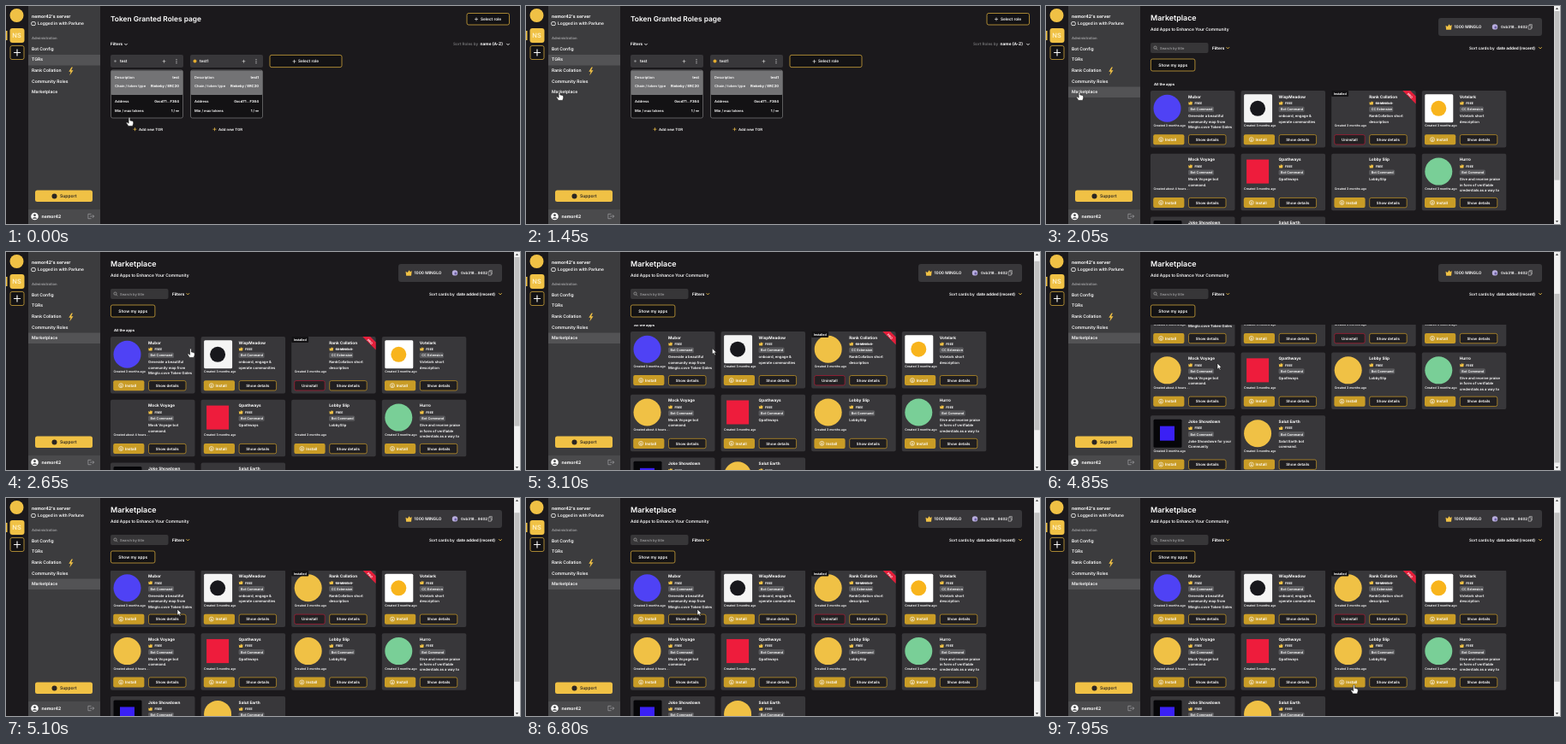
Animation of 600x255 px, one loop 8 s. Source, as an HTML page:

```html
<!DOCTYPE html>
<html lang="en">
<head>
<meta charset="utf-8">
<title>Server dashboard</title>
<style>
  html, body { margin: 0; width: 100%; height: 100%; overflow: hidden; background: #1b191c; }
  svg { display: block; width: 600px; height: 255px; }
  text { font: 600 5px Inter, Arial, sans-serif; fill: #fff; white-space: pre; text-rendering: geometricPrecision; }
  .b { font-weight: 700; }
</style>
</head>
<body>
<svg id="stage" viewBox="0 0 600 255"></svg>
<script>
const GOLD = '#f0c145', RIM = '#cda23a', PANEL = '#3c3c3e', CARD = '#38373a', BLACK = '#131214';
const END = 'text-anchor="end"', MID = 'text-anchor="middle"';

// Drawing helpers, each returning SVG markup
const text = (x, y, size, str, attrs = '') =>
  `<text x="${x}" y="${y}" style="font-size:${size}px" ${attrs}>${str.replace('&', '&amp;')}</text>`;
const bold = (x, y, size, str, attrs = '') => text(x, y, size, str, 'class="b" ' + attrs);
const tinted = (x, y, size, str, color) =>
  `<text x="${x}" y="${y}" style="font-size:${size}px;fill:${color}">${str}</text>`;
const rect = (x, y, w, h, fill, r = 0, attrs = '') =>
  `<rect x="${x}" y="${y}" width="${w}" height="${h}" rx="${r}" fill="${fill}" ${attrs}/>`;
const circle = (x, y, r, fill, attrs = '') => `<circle cx="${x}" cy="${y}" r="${r}" fill="${fill}" ${attrs}/>`;
const line = (d, color = '#fff', width = .8) => `<path d="${d}" fill="none" stroke="${color}" stroke-width="${width}"/>`;
const shape = (d, fill) => `<path d="${d}" fill="${fill}"/>`;
const box = (x, y, w, h, color = RIM, fill = BLACK) => rect(x, y, w, h, fill, 2, `stroke="${color}" stroke-width=".8"`);
const plus = (x, y, r, color, width) => line(`M${x - r} ${y}h${2 * r}M${x} ${y - r}v${2 * r}`, color, width);
const chevron = (x, y, color = '#fff') => line(`M${x - 1.7} ${y - .8}l1.7 1.7 1.7-1.7`, color, .9);
const coin = (x, y) => shape(`M${x - 2.3} ${y - 1.2}l1.5 .8 1.2-1.8 .9 1.3 1.2-.8-.5 3.8h-3.9z`, GOLD);

const menu = ['Bot Config', 'TGRs', 'Rank Collation', 'Community Roles', 'Marketplace'];

function sidebar() {
  return rect(26, 0, 84, 255, PANEL) + rect(26, 57, 84, 12.5, '#535355', 0, 'id="active"')
    + circle(12.5, 11, 8, GOLD)
    + rect(0, 29, 1.5, 11, GOLD) + rect(4.5, 26, 17, 17, GOLD, 3) + tinted(7.3, 37.2, 7.4, 'NS', '#fff3cc')
    + box(5, 46.5, 16, 16) + plus(13, 54.5, 4, '#fff', 1.1)
    + bold(30, 14.2, 5.2, "nemor42's server")
    + rect(29.7, 18.6, 4.6, 4, 'none', 1.2, 'stroke="#fff" stroke-width=".8"')
    + text(37, 22.3, 4.9, 'Logged in with Parlune')
    + tinted(30, 38.8, 4.2, 'Administration', '#a3a3a5')
    + menu.map((label, i) => text(30, 51.6 + 12.7 * i, 5, label)).join('')
    + shape('M76.5 71.5l-3.2 5.2h2.2l-1.2 4.5 4.2-6h-2.4l1.8-3.7z', GOLD)
    + rect(34, 215.5, 67, 13.5, GOLD, 2.5) + circle(56.5, 222.4, 3, '#2a2522')
    + tinted(63, 224.3, 5, 'Support', '#2a2522')
    + rect(26, 238, 84, 17, '#4a4a4c') + circle(33.5, 246, 4.3, '#fff') + circle(33.5, 244.7, 1.4, '#4a4a4c')
    + shape('M30.8 248.8a2.8 2.4 0 0 1 5.4 0z', '#4a4a4c') + bold(41.5, 248, 5.1, 'nemor42')
    + line('M99.5 243.3h-3.6v5.4h3.6M98 246h4.8m-1.7-1.7l1.7 1.7-1.7 1.7', '#a3a3a5', .7);
}

function roleColumn(x, name, dotColor, dotSize) {
  const rows = [['Description', name, 85], ['Chain / token type', 'Rinkeby / ERC20', 95.2],
    ['Address', '0xcd71...F364', 112.8], ['Min / max tokens', '1 / ∞', 123.8]];
  return rect(x, 57, 85, 15, CARD, 2) + circle(x + 5.5, 64.5, dotSize, dotColor) + text(x + 11, 66.2, 4.6, name)
    + plus(x + 62.5, 64.7, 1.9, '#ddd', .6)
    + [-2.1, 0, 2.1].map(d => circle(x + 77, 64.6 + d, .6, '#ddd')).join('')
    + box(x + .5, 75, 84, 56, '#707072', BLACK) + rect(x + .9, 75.4, 83.2, 28.6, '#737375', 1)
    + rows.map(([label, value, y]) => text(x + 5, y, 4.1, label) + bold(x + 80, y, 4.1, value, END)).join('')
    + plus(x + 28.5, 144.2, 2, GOLD, .7) + text(x + 33, 145.6, 4.3, 'Add new TGR');
}

function rolesPage() {
  return text(122, 17.6, 8.4, 'Token Granted Roles page')
    + box(538, 8.5, 49.5, 13.5) + plus(549, 15.4, 2, '#fff', .6) + text(554, 17.2, 4.7, 'Select role')
    + bold(122, 46.3, 4.6, 'Filters') + chevron(140, 44.7)
    + tinted(522, 46.3, 4.6, 'Sort Roles by', '#757577') + bold(553.5, 46.3, 4.8, 'name (A-Z)') + chevron(586, 44.7)
    + roleColumn(122, 'test', '#8a8a8c', 1.2) + roleColumn(215, 'test1', '#e2ab2e', 2)
    + box(308, 57.4, 84, 14.2) + plus(336.5, 64.8, 2, '#fff', .6) + text(341, 66.4, 4.7, 'Select role');
}

// Stand-in artwork for the app cards
const mascot = (x, y) => `<g class="late">${circle(x, y, 16, GOLD)}</g>`;
const tile = (color, mark) => (x, y) => rect(x - 16, y - 16.5, 33, 33, color, 1.5) + circle(x, y, 9, mark);
const disc = color => (x, y) => circle(x, y, 16, color);
const BOT = 'Bot Command', EXT = 'CC Extension';
const apps = [
  ['Mubor', BOT, ['Generate a beautiful', 'community map from', 'Minglo.cove Token Gates'], disc('#4f42f5')],
  ['WispMeadow', BOT, ['onboard, engage &', 'operate communities'], tile('#f4f4f4', '#17171c')],
  ['Rank Collation', EXT, ['RankCollation short', 'description'], mascot],
  ['Votelark', EXT, ['Votelark short', 'description'], tile('#fff', '#f8b41c')],
  ['Mock Voyage', BOT, ['Mock Voyage bot', 'command.'], mascot],
  ['Qpathways', BOT, ['Qpathways'], (x, y) => rect(x - 13, y - 14, 26, 28, '#ee1c3c')],
  ['Lobby Slip', BOT, ['LobbySlip'], mascot],
  ['Hurro', BOT, ['Give and receive praise', 'in form of verifiable', 'credentials as a way to'], disc('#79cf97')],
  ['Joke Showdown', BOT, ['Joke Showdown for your', 'Community'],
    (x, y) => rect(x - 16, y - 16.5, 33, 33, '#060609', 1.5) + rect(x - 8.5, y - 8.5, 17, 17, '#3a20f5')],
  ['Salut Earth', BOT, ['Salut Earth bot', 'command.'], mascot],
];

function appCard([name, tag, lines, art], i) {
  const x = 122 + 105.6 * (i % 4), y = 99 + 73.8 * Math.floor(i / 4), installed = i === 2;
  const age = i === 4 ? 'Created about 4 hours ...' : 'Created 3 months ago';
  let out = rect(x, y, 98.5, 66.5, CARD, 2) + art(x + 19.5, y + 20.8)
    + bold(x + 44, y + 8.6, 4.7, name)
    + coin(x + 46.5, y + 14.5) + bold(x + 51.5, y + 16, 3.5, installed ? '50 MINGLO' : 'FREE')
    + rect(x + 44, y + 18.6, tag === BOT ? 30 : 28, 6.4, '#59595c', 1.5) + text(x + 46.5, y + 23.2, 3.8, tag)
    + lines.map((s, n) => text(x + 44, y + 31.3 + 6.4 * n, 4.2, s)).join('')
    + text(x + 3.5, y + 42.2, 3.5, age)
    + box(x + 44.5, y + 51.6, 43.5, 11.4, '#b98f27', '#201e20') + text(x + 66.2, y + 58.9, 4.4, 'Show details', MID);
  if (installed) {
    out += line(`M${x + 51} ${y + 14.8}h21`, '#fff', .5)
      + rect(x, y, 20, 7, BLACK, 1) + bold(x + 2.5, y + 5, 3.6, 'Installed')
      + shape(`M${x + 83} ${y}h9l6.5 6.5v9z`, '#e51f3b')
      + `<g transform="translate(${x + 88} ${y + 4.2}) rotate(45)">${bold(0, 0, 3.6, 'PRO')}</g>`
      + box(x + 3.5, y + 51.6, 35.5, 11.4, '#a31f35', '#232022') + text(x + 21.2, y + 58.9, 4.4, 'Uninstall', MID);
  } else {
    out += rect(x + 3.2, y + 51.2, 36.2, 12, '#c99c26', 2)
      + circle(x + 12.2, y + 57.2, 2.5, 'none', 'stroke="#fff" stroke-width=".6"')
      + line(`M${x + 12.2} ${y + 55.6}v3m-1.1-1.1l1.1 1.1 1.1-1.1`, '#fff', .6)
      + text(x + 17, y + 58.9, 4.5, 'Install');
  }
  return out;
}

function marketPage() {
  return text(122, 17.2, 8.9, 'Marketplace') + text(122, 28.8, 4.9, 'Add Apps to Enhance Your Community')
    + rect(458, 14, 121, 21, CARD, 3) + `<g transform="translate(470 24.5) scale(1.5)">${coin(0, 0)}</g>`
    + text(476.5, 26.3, 4.8, '1000 MINGLO')
    + circle(524, 24.4, 3.2, '#b9aede') + circle(524.8, 25, 1.5, '#6f62a8') + text(531, 26.3, 4.4, '0xb318...9402')
    + line('M563.2 22.8h3v4.4h-3zM564.3 22.8v-1.2h3v4.4h-1.1', '#ccc', .6)
    + rect(122, 43, 67.5, 12, '#373638', 2) + circle(127.5, 48.6, 1.6, 'none', 'stroke="#bbb" stroke-width=".6"')
    + line('M128.6 49.8l1.5 1.5', '#bbb', .6) + tinted(133, 50.6, 4.1, 'Search by title', '#98989a')
    + bold(194, 50.6, 4.7, 'Filters') + chevron(212.3, 49, GOLD)
    + text(494, 50.6, 4.6, 'Sort cards by') + bold(526, 50.6, 4.7, 'date added (recent)') + chevron(577, 49, GOLD)
    + box(122.4, 62, 51.5, 14) + text(148.2, 70.8, 4.8, 'Show my apps', MID)
    + `<g clip-path="url(#list)"><g id="scroller">${bold(126, 93.2, 4.2, 'All the apps')}${apps.map(appCard).join('')}</g></g>`
    + rect(593, 0, 7, 255, '#f1f1f1') + rect(593.5, 6, 6, 197.6, '#c1c1c1', 0, 'id="thumb"')
    + shape('M594.8 4h3.4l-1.7-2.2zM594.8 251h3.4l-1.7 2.2z', '#505050');
}

const outline = 'fill="#fff" stroke="#111" stroke-width=".6" stroke-linejoin="round"';
document.getElementById('stage').innerHTML =
  `<clipPath id="list"><rect x="110" y="85" width="480" height="170"/></clipPath>`
  + rect(0, 0, 600, 255, '#1b191c') + sidebar()
  + `<g id="roles">${rolesPage()}</g><g id="market">${marketPage()}</g><g id="pointer">`
  + `<path id="hand" ${outline} d="M-.9.8Q0-.6.9.8V4l1.4.2 1.3.4 1.1.8V7.6L3.8 10.4H-1.2L-3.6 6.7Q-3.4 5.6-2.2 6.2L-.9 7.3z"/>`
  + `<path id="arrow" ${outline} d="M0 0V7.2L1.7 5.7 2.8 8.2 4 7.7 2.9 5.2H5z"/></g>`;

const el = id => document.getElementById(id);
const show = (node, on) => { node.style.display = on ? '' : 'none'; };
const ease = (t, from, to) => {
  const p = Math.min(1, Math.max(0, (t - from) / (to - from)));
  return p * p * (3 - 2 * p);
};

// Pointer moves: start time, end time, target x, target y
const moves = [[300, 1150, 47, 90], [1150, 1450, 39, 100], [2350, 2650, 215.5, 113],
  [2700, 3200, 217.5, 112.5], [4150, 4650, 200, 130], [7350, 7950, 359.5, 218.5]];

function render(t) {
  let x = 144, y = 130;
  for (const [from, to, tx, ty] of moves) {
    const p = ease(t, from, to);
    x += (tx - x) * p;
    y += (ty - y) * p;
  }
  const onMarket = t >= 2050;
  const hand = t < 2700 ? x < 109 || x > 121 : t >= 7850;
  const scroll = 58.5 * ease(t, 3000, 3500) - 44 * ease(t, 4800, 5100);

  show(el('roles'), !onMarket);
  show(el('market'), onMarket);
  document.querySelectorAll('.late').forEach(node => show(node, t >= 2700));
  el('active').setAttribute('y', onMarket ? 94.5 : 57);
  el('scroller').setAttribute('transform', `translate(0 ${-scroll})`);
  el('thumb').setAttribute('y', 6 + scroll * .776);
  el('pointer').setAttribute('transform', `translate(${x} ${y})`);
  show(el('hand'), hand);
  show(el('arrow'), !hand);
}

const STEP = 50, LOOP = 8000, start = performance.now();
function frame() {
  const t = (performance.now() - start) % LOOP;
  render(Math.floor(t / STEP) * STEP);
  requestAnimationFrame(frame);
}
frame();
</script>
</body>
</html>
```
